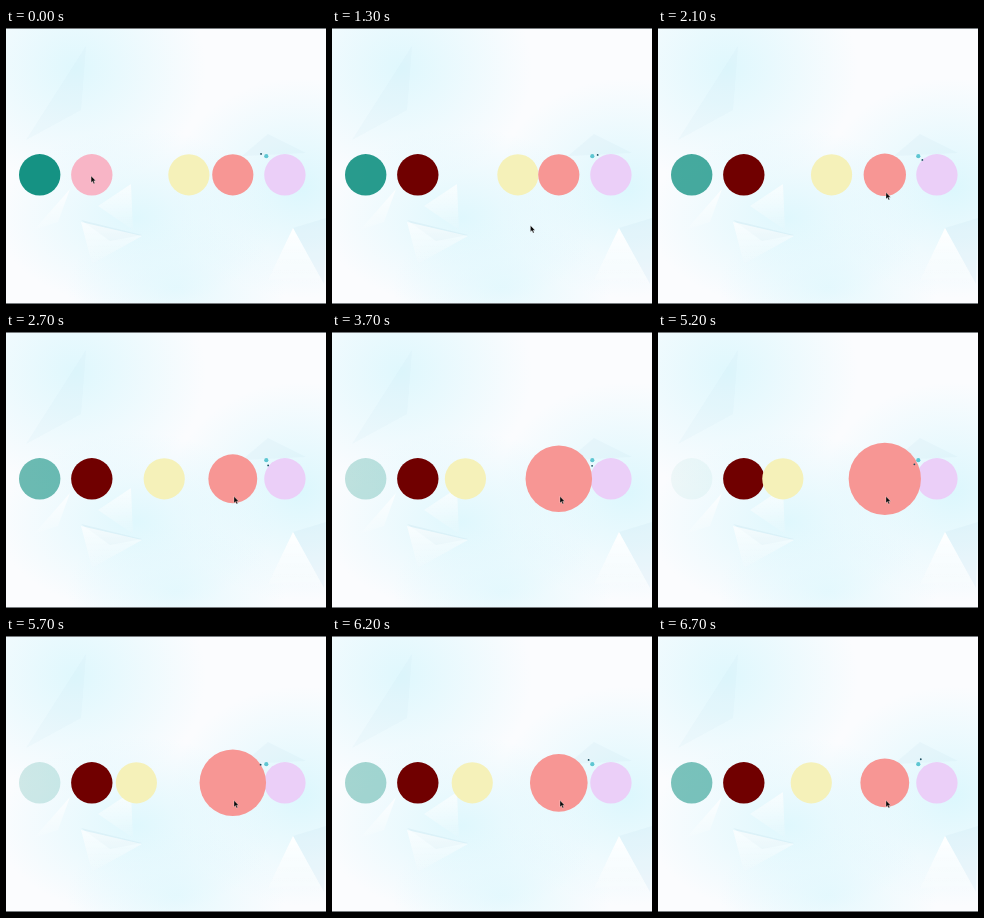
An HTML page that plays this animation: 320x276 px, repeating every 6.8 s.

```html
<!DOCTYPE html>
<html lang="en">
<head>
<meta charset="utf-8">
<title>Circle animations</title>
<style>
  html, body { margin: 0; width: 100%; height: 100%; overflow: hidden; background: #fbfcfe; }
  svg { display: block; width: 320px; height: 276px; }
</style>
</head>
<body>
<svg viewBox="0 0 320 276">
  <defs>
    <radialGradient id="glow">
      <stop offset="0" stop-color="#dcf7fd"/>
      <stop offset="1" stop-color="#dcf7fd" stop-opacity="0"/>
    </radialGradient>
    <linearGradient id="peak" x2="0" y2="1">
      <stop offset="0" stop-color="#fff"/>
      <stop offset="1" stop-color="#fff" stop-opacity=".1"/>
    </linearGradient>
  </defs>

  <rect width="320" height="276" fill="#fbfcfe"/>
  <g fill="url(#glow)">
    <ellipse cx="70" cy="40" rx="130" ry="120" opacity=".9"/>
    <ellipse cx="295" cy="160" rx="130" ry="110"/>
    <ellipse cx="130" cy="190" rx="140" ry="90" opacity=".9"/>
    <ellipse cx="170" cy="260" rx="110" ry="70" opacity=".7"/>
  </g>
  <g fill="#c4e2ee" opacity=".3">
    <path d="M80 18L20 112L75 82Z" opacity=".4"/>
    <path d="M236 128L262 106L300 125Z" opacity=".5"/>
    <path d="M75 192L136 207L104 213Z"/>
    <path d="M287 200L318 256L320 190Z" opacity=".6"/>
  </g>
  <g fill="url(#peak)">
    <path d="M64 161L28 202L52 194Z" opacity=".8"/>
    <path d="M125 156L127 202L92 178Z" opacity=".7"/>
    <path d="M75 194L136 208L86 236Z" opacity=".7"/>
    <path d="M287 200L262 252L318 256Z"/>
  </g>
  <path d="M0 .5H320M0 275.5H320" stroke="#777b7e"/>

  <circle id="fade" cx="33.7" cy="146.8" r="20.7" fill="#129182"/>
  <circle id="hover" cx="85.8" cy="146.8" r="20.7"/>
  <circle id="slide" cy="146.8" r="20.6" fill="#f5f1b9"/>
  <circle cx="278.9" cy="146.8" r="20.7" fill="#ebcff8"/>
  <circle id="grow" cx="226.8" cy="146.8" fill="#f79694"/>
  <circle cx="260.3" cy="128.2" r="2.1" fill="#5ec6d2"/>
  <circle id="moon" r=".9" fill="#174a5c"/>
  <path id="cursor" d="M0 0V6.4L1.5 5.1L2.6 7.6L3.7 7.1L2.6 4.7H4.6Z" fill="#080808" stroke="#fff" stroke-width=".3"/>
</svg>

<script>
const LOOP = 6800;
const set = (id, attrs) => {
  for (const k in attrs) document.getElementById(id).setAttribute(k, attrs[k]);
};

// cubic-bezier(.42, 0, .58, 1)
function easeInOut(x) {
  let lo = 0, hi = 1, s;
  for (let i = 0; i < 24; i++) {
    s = (lo + hi) / 2;
    if (3 * (1 - s) * s * (.42 * (1 - s) + .58 * s) + s ** 3 < x) lo = s; else hi = s;
  }
  return s * s * (3 - 2 * s);
}

// Eased 0 -> 1 -> 0 swing; each direction lasts dur
function swing(t, start, dur) {
  const u = ((t - start) / dur % 2 + 2) % 2;
  return easeInOut(u > 1 ? 2 - u : u);
}

// The pointer follows an arc from the second circle to the fourth
function pointer(t) {
  const u = Math.min(t / 2000, 1);
  return [
    85 + 143 * (1 - (1 - u) ** 1.5),
    148 + 16.5 * u + 43.5 * Math.sin(Math.PI * u)
  ];
}

// The orbit slows to rest at 4.2 s, then speeds up again
function orbit(t) {
  const s = t / 1000 - 4.2;
  const degrees = 453 + (s < 0 ? -9.2 * (-s) ** 2.3 : 40 * s ** 1.78);
  return degrees * Math.PI / 180;
}

function draw(t) {
  const [x, y] = pointer(t), a = orbit(t);
  const growth = t < 1700 ? 0 : swing(t, 1700, 3000);
  set('fade', { opacity: 1 - Math.exp(-((Math.abs(t - 4800) / 2170) ** 1.8)) });
  set('hover', { fill: Math.hypot(x - 85.8, y - 146.8) < 20.7 ? '#f8b5c6' : '#700000' });
  set('slide', { cx: 188 - 64.5 * swing(t, 790, 4000) });
  set('grow', { r: 20.6 * (1 + .8 * growth) });
  set('moon', { cx: 260.2 + 5.6 * Math.cos(a), cy: 128.2 + 5.6 * Math.sin(a) });
  set('cursor', { transform: `translate(${x} ${y})` });
}

const begin = performance.now();
function tick() {
  draw((performance.now() - begin) % LOOP);
  requestAnimationFrame(tick);
}
tick();
</script>
</body>
</html>
```
